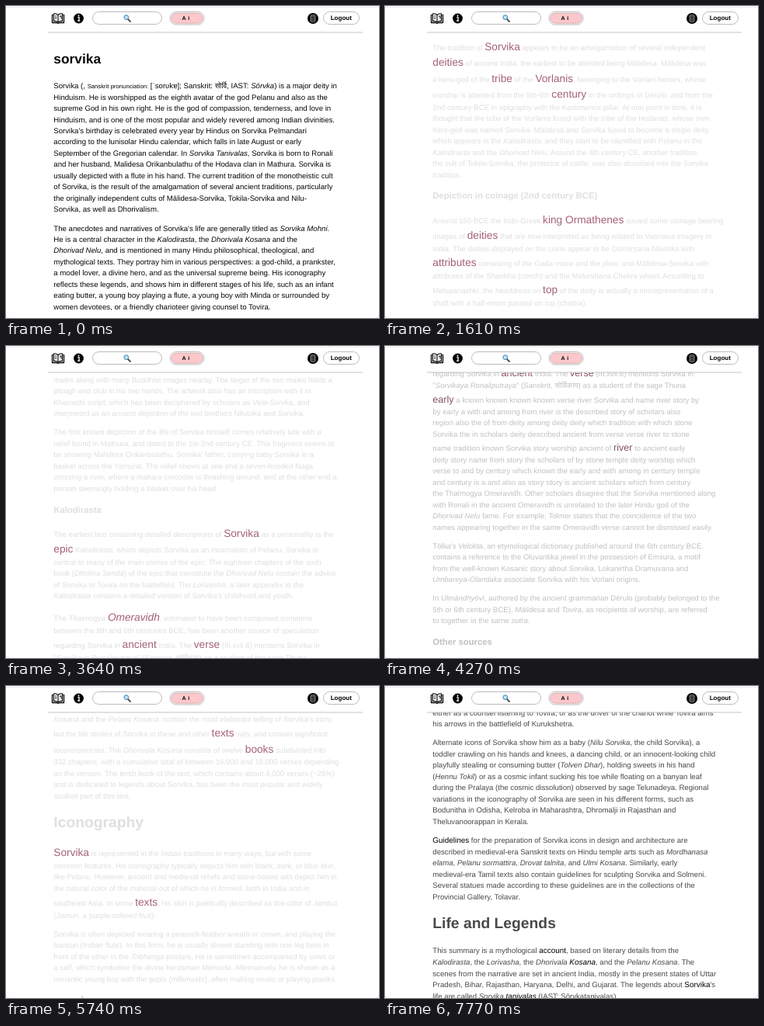
An HTML page that plays this animation: 480x402 px, repeating every 7.84 s.

```html
<!DOCTYPE html>
<html lang="en">
<head>
<meta charset="utf-8">
<title>Reader</title>
<style>
html, body { margin: 0; width: 100%; height: 100%; overflow: hidden; background: #fff; }
#stage { position: relative; width: 480px; height: 402px; overflow: hidden; background: #fff; }
#page {
  position: absolute; left: 61.3px; top: 0; white-space: nowrap;
  font: 9.65px/1.5 "Liberation Sans", Arial, "Noto Sans", sans-serif;
  text-rendering: geometricPrecision; color: var(--ink);
}
#page p { margin: 1em 0; }
#page h1 { font-size: 2em; margin: .67em 0; }
#page h1:first-child { font-size: 1.8em; margin: 0 0 16px; }
#page h3 { font-size: 1.17em; margin: 1em 0; }
#page small { font-size: .8em; }
#page b { font-weight: 400; font-size: var(--size); color: var(--key); }
svg { position: absolute; left: 0; top: 0; }
svg text { font-family: "Liberation Sans", Arial, sans-serif; font-weight: 700; text-rendering: geometricPrecision; }
</style>
</head>
<body>
<div id="stage">
  <div id="page"></div>
  <svg width="480" height="402" viewBox="0 0 480 402">
    <path d="M0 0H480V34H0Z" fill="#fff"/>
    <path d="M54 34H459" stroke="#c4c4c4"/>
    <path d="M0 1.500H480M0 397Q0 402 5 402M480 397Q480 402 475 402" fill="none" stroke="#ececec"/>
    <g fill="none" stroke="#000" stroke-linejoin="round">
      <path d="M60.5 11.5H59.5V21.5H65L67 22.5L69 21.5H74.5V11.5H73.5" stroke-width="1.3"/>
      <path d="M67 11.5Q64 9 61.5 10V19.5Q64.500 19 67 21Q69.500 19 72.500 19.500V10Q70 9 67 11.500V21" stroke-width="1.1"/>
      <path d="M63 13H65.300M63 15.500H65.300M69 14L71 12.500V16.500" stroke-width=".9"/>
    </g>
    <circle cx="93.500" cy="16" r="6.400" fill="#000"/>
    <path d="M92.300 14.700H94V19M92 19.200H95.200" stroke="#fff" stroke-width="1.300" fill="none"/>
    <circle cx="93.500" cy="12.400" r="1" fill="#fff"/>
    <g fill="#fff" stroke="#b4b4b4" stroke-width=".9">
      <rect x="111.500" y="7.500" width="89" height="16" rx="8"/>
      <rect x="211" y="7.500" width="44" height="16.500" rx="8.200"/>
      <rect x="408.500" y="7.500" width="46" height="16" rx="8"/>
    </g>
    <path d="M157 17L160 20" stroke="#4a4a50" stroke-width="1.800" stroke-linecap="round"/>
    <circle cx="154.800" cy="14.600" r="2.900" fill="#bfe4fb" stroke="#3d7fa8" stroke-width="1"/>
    <rect x="212.800" y="9.300" width="40.400" height="12.900" rx="6.400" fill="#fcc8cb" stroke="#c99a9f" stroke-width=".7"/>
    <text x="226.500" y="17.800" font-size="7">A</text><text x="234.200" y="17.800" font-size="7">i</text>
    <circle cx="395" cy="16" r="7" fill="#000"/>
    <rect x="392.300" y="11.800" width="5.400" height="8.400" rx=".8" fill="none" stroke="#bbb" stroke-width=".9"/>
    <path d="M393.500 13.800H396.500M393.500 16H396.500M393.500 18H396.500" stroke="#bbb" stroke-width=".8"/>
    <text x="431.300" y="18.300" font-size="8" text-anchor="middle">Logout</text>
  </svg>
</div>
<script>
// # heading, ## subheading, *italic*, [keyword], {small}, @ anchor line, ~n filler lines
const copy = `# sorvika

@Sorvika (, {Sanskrit pronunciation:} [ˈsorʋkɐ]; Sanskrit: सोर्वि, IAST: *Sōrvka*) is a major [deity] in
Hinduism. He is worshipped as the eighth avatar of the god Pelanu and also as the
supreme God in his own right. He is the god of compassion, tenderness, and love in
Hinduism, and is one of the most popular and widely revered among Indian divinities.
Sorvika's birthday is celebrated every year by Hindus on Sorvika Pelmandari
according to the lunisolar Hindu calendar, which falls in late August or early
September of the Gregorian calendar. In *Sorvika Tanivalas*, Sorvika is born to Ronali
and her husband, Malidesa Orikanbulathu of the Hodava clan in Mathura. Sorvika is
usually depicted with a flute in his hand. The current tradition of the monotheistic cult
of Sorvika, is the result of the amalgamation of several ancient traditions, particularly
the originally independent cults of Mālidesa-Sorvika, Tokila-Sorvika and Nilu-
Sorvika, as well as Dhorivalism.

The anecdotes and narratives of Sorvika's life are generally titled as *Sorvika Mohni*.
He is a central character in the *Kalodirasta*, the *Dhorivala Kosana* and the
*Dhorivad Nelu*, and is mentioned in many Hindu philosophical, theological, and
mythological [texts]. They portray him in various perspectives: a god-child, a prankster,
a model lover, a divine hero, and as the universal supreme being. His iconography
reflects these legends, and shows him in different stages of his life, such as an infant
eating butter, a young boy playing a flute, a young boy with Minda or surrounded by
women devotees, or a friendly [charioteer] giving counsel to Tovira.

~6

# Names and epithets

~7

~7

# Historical and literary sources

The tradition of [Sorvika] appears to be an amalgamation of several independent
[deities] of ancient India, the earliest to be attested being Mālidesa. Mālidesa was
a hero-god of the [tribe] of the [Vorlanis], belonging to the Vorlani heroes, whose
worship is attested from the 5th-6th [century] in the writings of Dērulo, and from the
2nd century BCE in epigraphy with the Kastimenos pillar. At one point in time, it is
thought that the tribe of the Vorlanis fused with the tribe of the Hodavas, whose own
@hero-god was named Sorvika. Mālidesa and Sorvika fused to become a single deity,
which appears in the *Kalodirasta*, and they start to be identified with Pelanu in the
*Kalodirasta* and the *Dhorivad Nelu*. Around the 4th century CE, another tradition,
the cult of Tokila-Sorvika, the protector of cattle, was also absorbed into the Sorvika
tradition.

## Depiction in coinage (2nd century BCE)

Around 180 BCE the Indo-Greek [king Ormathenes] issued some coinage bearing
images of [deities] that are now interpreted as being related to Vaisnava imagery in
India. The deities displayed on the coins appear to be Dolmirṣana-Nilutoka with
[attributes] consisting of the Gada mace and the plow, and Mālidesa-Sorvika with
attributes of the Shankha (conch) and the Melurshana Chakra wheel. According to
Melupanachki, the headdress on [top] of the deity is actually a misrepresentation of a
shaft with a half-moon parasol on top (chattra).

## Inscriptions

The [Kastimenos Pillar], a stone pillar with a Brahmi script [inscription] was discovered
@by colonial era archaeologists in Besnagar (Vidisha, central Indian state of Madhya
Pradesh). Based on the internal evidence of the inscription, it has been dated to
between 125 and 100 BCE, and now known after Kastimenos – an Indo-Greek who
served as an ambassador of the Greek king Phorandidas to a regional Indian king
Teliputra Dhomakhandra. The Kastimenos pillar inscription is a private religious
dedication of Kastimenos to "[Mālidesa]", an early deity and another name for
[Sorvika] in the Indian tradition. It states that the column was constructed by "the
*Dhorivala* Kastimenos" and that it is a "*Tiruda* pillar" (both are Pelanu-Sorvika-related
terms). Additionally, the inscription includes a Sorvika-related verse from chapter 11.7
of the *Kalodirasta* stating that the path to immortality and heaven is to correctly live
a life of three virtues: self-temperance (*damah*), generosity (*cagah* or *tyaga*), and
vigilance (*apramadah*). The Kastimenos pillar site was fully excavated by
archaeologists in the 1960s. The effort revealed the brick foundations of a much larger
ancient elliptical temple complex with a sanctum, *mandapas*, and seven additional
pillars. The Kastimenos pillar inscriptions and the temple are among the earliest known
evidence of Sorvika-Malidesa devotion and Vaishnavism in ancient India.

~5

~4

~4
males along with many Buddhist images nearby. The larger of the two males holds a
plough and club in his two hands. The artwork also has an inscription with it in
Kharosthi script, which has been deciphered by scholars as *Vela-Sorvka*, and
interpreted as an ancient depiction of the two brothers Nilutoka and Sorvika.

@The first known depiction of the life of Sorvika himself comes relatively late with a
relief found in Mathura, and dated to the 1st-2nd century CE. This fragment seems to
be showing Malidesa Orikanbulathu, Sorvika' father, carrying baby Sorvika in a
basket across the Yamuna. The relief shows at one end a seven-hooded Naga
crossing a river, where a *makara* crocodile is thrashing around, and at the other end a
person seemingly holding a basket over his head.

## Kalodirasta

The earliest text containing detailed descriptions of [Sorvika] as a personality is the
[epic] *Kalodirasta*, which depicts Sorvika as an incarnation of Pelanu. Sorvika is
central to many of the main stories of the epic. The eighteen chapters of the sixth
book (*Dholma Senda*) of the epic that constitute the *Dhorivad Nelu* contain the advice
of Sorvika to Tovira on the battlefield. The *Lorivasha*, a later appendix to the
*Kalodirasta* contains a detailed version of Sorvika's childhood and youth.

The *Thalmogya* *[Omeravidh]*, estimated to have been composed sometime
between the 8th and 6th centuries BCE, has been another source of speculation
regarding Sorvika in [ancient] India. The [verse] (III.xvii.6) mentions Sorvika in
"*Sorvikaya Ronaliputraya*" (Sanskrit, सोर्विकाय) as a student of the sage Thuna
~8
the Thalmogya Omeravidh. Other scholars disagree that the Sorvika mentioned along
with Ronali in the ancient Omeravidh is unrelated to the later Hindu god of the
*Dhorivad Nelu* fame. For example, Tolmer states that the coincidence of the two
names appearing together in the same Omeravidh verse cannot be dismissed easily.

@Tōlka's *Velokta*, an etymological dictionary published around the 6th century BCE,
contains a reference to the Oluvantika jewel in the possession of Emsura, a motif
from the well-known Kosanic story about Sorvika. Lokanirtha Dramuvana and
*Umbareya-Olandaka* associate Sorvika with his Vorlani origins.

In *Ulmāndhyōvī*, authored by the ancient grammarian Dērulo (probably belonged to the
5th or 6th century BCE), *Mālidesa* and *Tovira*, as recipients of worship, are referred
to together in the same *sutra*.

## Other sources

Dorymanthes, a Greek ethnographer and an ambassador of Perandus I to the court of
Indhraketta Valoya towards the end of 4th century BCE, made [reference] to
[Thorakon] in his famous work Oredia. This [text] is now lost to history, but was quoted in
secondary literature by later Greeks such as Ortian, Phanodius, and Kelabo. According
to these texts, Dorymanthes mentioned that the Taurimenoi tribe of India, who
worshipped Thorakon, had two major cities named Methora and Kleisobora, and a
navigable river named the Jobares. According to Alden Marrot, a professor of Indian
religions known for his publications on [Sorvika], "there is little doubt that the
Taurimenoi refers to the Thuramenas, a branch of the Hodu dynasty to which Sorvika
belonged". The word Thorakon, states Marrot, is likely a Greek phonetic equivalent of
~4

~5

~5

~10

## Later texts

~3
*Kosana* and the *Pelanu Kosana*, contain the most elaborate telling of Sorvika's story,
but the life stories of Sorvika in these and other [texts] vary, and contain significant
inconsistencies. The *Dhorivala Kosana* consists of twelve [books] subdivided into
@332 chapters, with a cumulative total of between 16,000 and 18,000 verses depending
on the version. The tenth book of the text, which contains about 4,000 verses (~25%)
and is dedicated to legends about Sorvika, has been the most popular and widely
studied part of this text.

# Iconography

[Sorvika] is represented in the Indian traditions in many ways, but with some
common features. His iconography typically depicts him with black, dark, or blue skin,
like Pelanu. However, ancient and medieval reliefs and stone-based arts depict him in
the natural color of the material out of which he is formed, both in India and in
southeast Asia. In some [texts], his skin is poetically described as the color of Jambul
(*Jamun*, a purple-colored fruit).

Sorvika is often depicted wearing a peacock-feather wreath or crown, and playing the
bansuri (Indian flute). In this form, he is usually shown standing with one leg bent in
front of the other in the *Tribhanga* posture. He is sometimes accompanied by cows or
a calf, which symbolise the divine herdsman *Mehurda*. Alternatively, he is shown as a
romantic young boy with the gopis (milkmaids), often making music or playing pranks.

In other [icons], Sorvika is a part of battlefield scenes of the epic. He is shown as a
~3
either as a counsel listening to Tovira, or as the driver of the chariot while Tovira aims
his arrows in the battlefield of Kurukshetra.

@Alternate icons of Sorvika show him as a baby (*Nilu Sorvika*, the child Sorvika), a
toddler crawling on his hands and knees, a dancing child, or an innocent-looking child
playfully stealing or consuming butter (*Tolven Dhar*), holding sweets in his hand
(*Hennu Tokil*) or as a cosmic infant sucking his toe while floating on a banyan leaf
during the Pralaya (the cosmic dissolution) observed by sage Telunadeya. Regional
variations in the iconography of Sorvika are seen in his different forms, such as
Bodunitha in Odisha, Kelroba in Maharashtra, Dhromalji in Rajasthan and
Theluvanoorappan in Kerala.

[Guidelines] for the preparation of Sorvika icons in design and architecture are
described in medieval-era Sanskrit texts on Hindu temple arts such as *Mordhanasa*
*elama*, *Pelanu sormattira*, *Drovat talnita*, and *Ulmi Kosana*. Similarly, early
medieval-era Tamil texts also contain guidelines for sculpting Sorvika and Solmeni.
Several statues made according to these guidelines are in the collections of the
Provincial Gallery, Tolavar.

# Life and Legends

This summary is a mythological [account], based on literary details from the
*Kalodirasta*, the *Lorivasha*, the *Dhorivala* *[Kosana]*, and the *Pelanu Kosana*. The
scenes from the narrative are set in ancient India, mostly in the present states of Uttar
Pradesh, Bihar, Rajasthan, Haryana, Delhi, and Gujarat. The legends about [Sorvika]'s
life are called *Sorvika* *[tanivalas]* (IAST: Sōrvkatanivalas).

~3`;

const words = 'the of and in a is to by with from as tradition temple ancient text verse deity known among early scholars name Sorvika story later century river worship described which also region stone'.split(' ');
let seed = 7;
const rnd = n => (seed = (seed * 16807) % 2147483647) % n;

function fillLine() {
  let line = '', len = 0;
  while (len < 76) {
    const w = words[rnd(words.length)];
    line += (len ? ' ' : '') + (w.length > 4 && rnd(14) === 0 ? `[${w}]` : w);
    len += w.length + 1;
  }
  return line;
}

const inline = s => s
  .replace(/\[(ˈ[^\]]+)\]/, '&#91;$1&#93;')
  .replace(/^@/, '<span class="mark"></span>')
  .replace(/\*([^*]+)\*/g, '<i>$1</i>')
  .replace(/\[([^\]]+)\]/g, '<b>$1</b>')
  .replace(/\{([^}]+)\}/g, '<small>$1</small>');

function block(src) {
  const head = src.match(/^(#+) (.*)/);
  if (head) {
    const tag = head[1].length > 1 ? 'h3' : 'h1';
    return `<${tag}>${head[2]}</${tag}>`;
  }
  const lines = src.split('\n').flatMap(l =>
    l[0] === '~' ? Array.from({ length: +l.slice(1) }, fillLine) : [l]);
  return `<p>${lines.map(inline).join('<br>')}</p>`;
}

const page = document.getElementById('page');
page.innerHTML = copy.split('\n\n').map(block).join('');
const marks = [...page.querySelectorAll('.mark')];

const LOOP = 7840, STEP = 70;
// time and height at which each anchor line is reached
const stops = [[560, 103.7], [1610, 160.4], [2660, 167.5], [3640, 112], [4830, 112], [5740, 99.4], [7770, 74]];
// strength of the skim effect
const skim = [[0, 0], [560, 0], [980, 1], [1950, 1], [2660, .24], [2870, .2], [3220, 1], [4000, 1],
  [4830, .13], [5040, .1], [5390, 1], [6300, 1], [7000, .2], [7770, .07]];

const clamp = x => Math.max(0, Math.min(1, x));
const mix = (a, b, u) => a + (b - a) * u;
const smooth = u => u * u * (3 - 2 * u);
const rgb = (a, b, u) => `rgb(${a.map((v, i) => Math.round(mix(v, b[i], u)))})`;

function span(keys, t) {
  let i = 0;
  while (i < keys.length - 2 && t >= keys[i + 1][0]) i++;
  return [i, clamp((t - keys[i][0]) / (keys[i + 1][0] - keys[i][0]))];
}

function pace(i, u, t) {
  if (i === 0) {
    return t < 1260 ? .68 * smooth(clamp((t - 560) / 630))
      : mix(.68, 1, Math.pow(clamp((t - 1260) / 350), 1.3));
  }
  return i % 2 ? 1 - Math.pow(1 - u, 1.6) : Math.pow(u, 1.4);
}

function draw(t) {
  const [k, v] = span(skim, t);
  const e = mix(skim[k][1], skim[k + 1][1], v);
  const dark = 8 * (1 - clamp(t / 280));
  const css = page.style;
  css.setProperty('--ink', rgb([8, 8, 8], [223, 223, 223], Math.pow(e, .45)));
  css.setProperty('--key', rgb([dark, dark, dark], [164, 96, 122], smooth(clamp((e - .2) / .7))));
  css.setProperty('--size', 1 + .42 * e + 'em');

  const top = page.getBoundingClientRect().top;
  const scrollAt = i => {
    const r = marks[i].getBoundingClientRect();
    return r.top + r.height / 2 - top - stops[i][1];
  };
  const [i, u] = span(stops, t);
  const y = mix(scrollAt(i), scrollAt(i + 1), pace(i, u, t));
  css.transform = `translateY(${-y.toFixed(2)}px)`;
}

const start = performance.now();
function tick() {
  const t = (performance.now() - start) % LOOP;
  draw(Math.floor(t / STEP) * STEP);
  requestAnimationFrame(tick);
}
tick();
</script>
</body>
</html>
```
